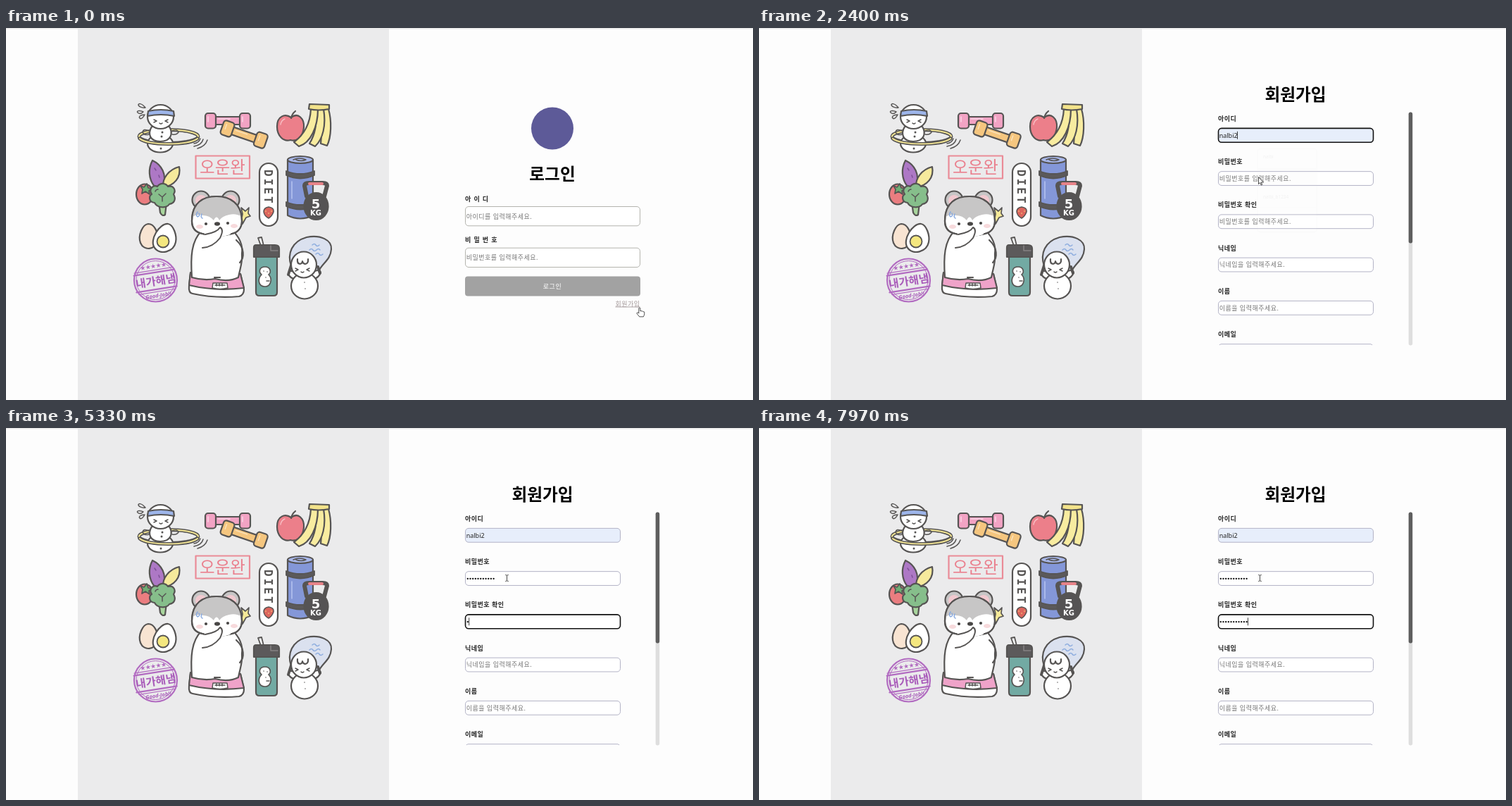
Write an HTML page that moves like this. It is 1061 px wide and 528 px high and loops after 8000 ms.

```html
<!DOCTYPE html>
<html lang="ko">
<head>
<meta charset="utf-8">
<title>회원가입</title>
<style>
html, body { margin: 0; width: 100%; height: 100%; overflow: hidden; background: #fdfdfd; }
svg { display: block; }
text { font: 9px "Noto Sans", "Noto Sans CJK KR", "Noto Sans CJK", sans-serif; letter-spacing: .5px; fill: #222; }
text.title { font-size: 23.7px; font-weight: 700; letter-spacing: 0; text-anchor: middle; fill: #000; }
text.label { font-weight: 700; }
text.wide { letter-spacing: .9px; }
text.hint { fill: #757575; }
text.tiny { font-size: 6.4px; letter-spacing: 0; fill: #777; }
#art { fill: #fff; stroke: #565453; stroke-width: 2.2; stroke-linecap: round; stroke-linejoin: round; }
#art text { stroke: none; letter-spacing: 0; }
#art .thin { stroke-width: 1.5; fill: none; }
#art .flat { stroke: none; }
</style>
</head>
<body>
<svg width="1061" height="528" viewBox="0 0 1061 528">
  <defs>
    <clipPath id="formClip"><rect x="640" y="118" width="260" height="332"/></clipPath>
    <path id="head" d="M264 274C264 248 280 239 299 239S335 249 335 274C335 284 329 290 321 292Q299 298 279 292C269 290 264 284 264 274Z"/>
    <clipPath id="headClip"><use href="#head"/></clipPath>
  </defs>
  <rect width="1061" height="528" fill="#fdfdfd"/>
  <rect x="102" width="442" height="528" fill="#ebebec"/>
  <rect width="1061" height="1.5" fill="#e8e8e8"/>

  <g id="art">
    <!-- hula hoop -->
    <path class="thin" d="M198 113C192 106 188 107 188 109S193 114 198 113M195 119C189 116 185 118 187 120S192 122 195 119M197 123C191 123 188 126 190 128S195 127 197 123"/>
    <ellipse cx="231" cy="154" rx="42" ry="9.5" fill="none" stroke-width="5"/>
    <ellipse cx="231" cy="154" rx="42" ry="9.5" fill="none" stroke="#f5e794" stroke-width="2"/>
    <ellipse cx="219" cy="164" rx="18" ry="12.5"/>
    <path d="M207 140C201 150 204 161 219 161S238 150 232 140Z"/>
    <ellipse cx="219.5" cy="126" rx="18.5" ry="17"/>
    <path d="M202 118Q220 114 238 118L239 125Q220 121 201 125Z" fill="#9db5ea"/>
    <path class="thin" d="M210 130l4 2-4 2M230 130l-4 2 4 2M218 135q2 2 4 0M203 146q-8-4-9 2q3 5 9 3M236 146q8-3 9 2q-3 4-9 3"/>
    <path d="M190 157C201 167 260 167 272 157" fill="none" stroke-width="5"/>
    <path d="M190 157C201 167 260 167 272 157" fill="none" stroke="#f5e794" stroke-width="2"/>
    <path class="thin" d="M267 164q7-1 9-7M267 168q11-2 13-10M272 171q11-3 14-12"/>
    <g class="flat" fill="#565453"><circle cx="222" cy="148" r="1.5"/><circle cx="221" cy="154" r="1.5"/><circle cx="220" cy="171" r="1.5"/></g>

    <!-- dumbbells -->
    <g fill="#f2a3c4">
      <rect x="295" y="126" width="39" height="11"/>
      <rect x="283" y="121" width="15" height="21.5" rx="4"/><rect x="332" y="121" width="15" height="21.5" rx="4"/>
      <path class="thin" d="M287 126v7M336 126v7M301 129h17" stroke="#fbd9e7"/>
    </g>
    <g fill="#f5c67f" transform="translate(338 151.5) rotate(19)">
      <rect x="-20" y="-5.5" width="40" height="11"/>
      <rect x="-33" y="-11" width="16" height="21" rx="4"/><rect x="17" y="-11" width="16" height="21" rx="4"/>
      <path class="thin" d="M-28-6v7M22-6v7M-13-2h17" stroke="#fbe3bd"/>
    </g>

    <!-- fruit -->
    <path d="M405 127C415 119 424 129 423 141C422 154 413 162 404 159C394 162 385 153 385 140C385 125 396 121 405 127Z" fill="#ec7f8a"/>
    <path d="M405 128q1-6 6-10" fill="none"/>
    <path class="thin" d="M390 137q1-6 6-8" stroke="#f8bcc2"/>
    <g fill="#f8eca0">
      <path d="M446 115H458C463 132 462 155 456 167L447 164C449 148 448 132 446 115Z"/>
      <path d="M440 115H451C455 138 450 158 439 168L431 164C440 150 442 135 440 115Z"/>
      <path d="M433 115H443C443 140 433 163 416 168L409 162C424 151 432 135 433 115Z"/>
      <path d="M431 108L459 109L459 115Q444 118 430 115Z" fill="#f3e38b"/>
    </g>

    <!-- banner -->
    <rect x="269.5" y="181.5" width="76.5" height="32" fill="none" stroke="#ea8b97"/>
    <text x="307.5" y="206" style="font-size:23.5px;text-anchor:middle;fill:#ea7f8d">오운완</text>

    <!-- vegetables -->
    <path d="M208 188C221 194 229 208 223 224L211 225C202 214 202 199 208 188Z" fill="#ad78c5"/>
    <path d="M246 197C249 212 239 224 223 226C222 213 231 201 246 197Z" fill="#f6ea9c"/>
    <path class="thin" d="M211 199l2 3M217 209l1 3" stroke="#7f5297"/>
    <ellipse cx="197" cy="236" rx="12" ry="14.5" fill="#ea7d80"/>
    <path d="M191 224l5 2 4-5 2 6 6 1-5 3 1 5-6-4-5 3 1-6Z" fill="#6fae74" stroke-width="1.7"/>
    <path d="M217 247L219 262Q222 268 226 265L228 248Z" fill="#a8d59d"/>
    <path d="M211 248C202 247 203 238 207 236C202 229 209 222 215 225C219 219 227 220 230 225C238 223 242 230 238 236C242 243 239 249 232 250C228 256 215 256 211 248Z" fill="#86be8b"/>
    <path class="thin" d="M217 236l5 4 5-5M222 240v6M212 232q1-3 4-3"/>

    <!-- capsule -->
    <rect x="360" y="192" width="26" height="89" rx="13"/>
    <text transform="translate(367 201) rotate(90)" style="font:700 16px 'DejaVu Sans Mono',monospace;letter-spacing:3px;fill:#565453">DIET</text>
    <path d="M373 254q8 1 7 7q-2 6-7 9q-6-3-7-9q0-6 7-7Z" fill="#dd665d" stroke-width="1.5"/>
    <path class="thin" d="M369 260h.1M373 263h.1M377 260h.1" stroke="#f7df85"/>

    <!-- mat and kettlebell -->
    <path d="M400 187V266Q418 275 436 266V187Z" fill="#8497d8"/>
    <ellipse cx="418" cy="187" rx="18" ry="5" fill="#a9b8eb"/>
    <path class="thin" d="M408 187q9-4 18 0q-7 3-14 0"/>
    <path class="thin" d="M406 218v24" stroke="#b7c4f0"/>
    <path d="M398 203Q418 211 438 203V209Q418 218 398 209ZM398 247Q418 255 438 247V253Q418 262 398 253Z" fill="#5b595a" stroke-width="1.8"/>
    <path d="M427 239L424 224Q424 220 430 220H450Q456 220 456 224L452 239" fill="none" stroke-width="6"/>
    <path d="M431 221h18" stroke="#e78288" stroke-width="4"/>
    <ellipse cx="440.5" cy="253" rx="17" ry="19" fill="#555354"/>
    <text x="440" y="256" style="font:900 18px 'DejaVu Sans',sans-serif;text-anchor:middle;fill:#fff">5</text>
    <text x="440" y="265.5" style="font:900 10px 'DejaVu Sans',sans-serif;text-anchor:middle;fill:#fff">KG</text>

    <!-- eggs -->
    <path d="M202 278C211 278 217 291 215 302C212 315 196 317 191 305C187 294 194 279 202 278Z" fill="#f8e4d2"/>
    <path d="M230 278C238 279 243 295 241 304C238 318 219 323 211 312C203 301 218 277 230 278Z"/>
    <circle cx="223" cy="303" r="8.5" fill="#f4e77f" stroke-width="1.8"/>

    <!-- purple stamp -->
    <g fill="none" stroke="#b26cc1">
      <circle cx="212.5" cy="358" r="30.5"/>
      <circle cx="212.5" cy="358" r="27.5" stroke-width="1"/>
      <g transform="rotate(-9 212 358)">
        <path d="M183 347H241M183 371H241" stroke-width="2.2"/><path d="M184 343.5H240M186 374.5H238" stroke-width="1.2"/>
        <text x="212.5" y="365" style="font-size:15.6px;font-weight:700;text-anchor:middle;fill:#a95cba">내가해냄</text>
        <text x="212" y="341" style="font:9px 'DejaVu Sans',sans-serif;letter-spacing:-.5px;text-anchor:middle;fill:#b26cc1">★★★★★</text>
        <text x="213" y="382.5" style="font:italic 700 7.5px 'Noto Sans',sans-serif;text-anchor:middle;fill:#a95cba">Good-Job!!</text>
      </g>
    </g>

    <!-- hamster on scale -->
    <path d="M262 348Q298 342 333 349L338 371Q338 379 331 381Q297 384 265 377Q259 376 260 366Z"/>
    <path d="M262 347Q298 342 333 349L338 369Q297 374 260 365Z" fill="#efa3c9"/>
    <path d="M294 362h20l1 7q-11 3-22 0Z" stroke-width="1.5"/><path class="thin" d="M297 365h14M299 363v3M303 363v3M307 363v3"/>
    <path d="M278 288C263 302 262 325 264 354Q281 359 297 356Q316 361 330 354C332 342 336 335 335 321C337 308 331 296 322 288Z"/>
    <path d="M327 301C339 312 339 326 332 333M296 354h8" fill="none"/>
    <circle cx="277" cy="244" r="12.5" fill="#c7c6c6"/><circle cx="319" cy="244" r="12.5" fill="#c7c6c6"/>
    <circle class="flat" cx="277" cy="245" r="8" fill="#f1c9cf"/><circle class="flat" cx="319" cy="245" r="8" fill="#f1c9cf"/>
    <use href="#head"/>
    <path class="flat" clip-path="url(#headClip)" fill="#c7c6c6" d="M262 270V236H338V270Q328 262 317 265Q307 267 303 273Q299 264 295 273Q289 266 280 266Q271 263 262 270Z"/>
    <use href="#head" fill="none"/>
    <path d="M284 292Q299 297 317 291" stroke="#fff" fill="none" stroke-width="4.5"/>
    <path d="M279 312Q294 311 304 298Q310 286 304 283Q300 290 283 293" stroke-width="2"/>
    <path class="thin" d="M272 261q-3 5 0 7q4-1 2-5M278 264q-2 5 1 6" stroke="#86a8df"/>
    <g class="flat"><ellipse cx="275" cy="282" rx="5" ry="3" fill="#f7dadc"/><ellipse cx="324" cy="281" rx="5" ry="3" fill="#f7dadc"/>
    <g fill="#494746"><circle cx="284" cy="278" r="2.1"/><circle cx="315" cy="277" r="2.1"/><ellipse cx="300" cy="278" rx="4" ry="2.8"/></g></g>
    <path d="M334 255l6 5 5-5-1 8 3 4-6 2-5 9-1-9 1-5Z" fill="#f5e998" stroke-width="1.7"/>

    <!-- bottle -->
    <path d="M362 309L358 298L363 297L366 309" fill="#f7f7f7" stroke-width="1.8"/>
    <path d="M355 324V375Q355 380 360 380H380Q385 380 385 375V324Z" fill="#72aaa3"/>
    <path d="M355 308H382Q388 308 388 313V325H352V312Q352 308 355 308Z" fill="#5c5a5b"/>
    <path class="thin" d="M376 309v7h10" stroke="#858384"/>
    <path d="M368 339c8 0 9 8 5 11c6 6 3 17-5 17c-10 0-11-11-5-17c-4-3-4-11 5-11Z" stroke-width="1.7"/>
    <path class="thin" d="M366 345h.1M371 346h.1M369 354v.1M370 359h4"/>

    <!-- jump rope -->
    <path d="M405 338C399 320 406 303 427 297C447 293 463 301 462 314C461 329 450 333 444 345" fill="#dbe1ef"/>
    <path class="thin" d="M435 308q3-3 5 0t5 0M431 315q3-3 5 0t5 0t5 0M440 321q3-3 5 0t5 0" stroke="#8eaddf"/>
    <path d="M412 347Q402 342 401 349Q404 356 411 356M435 347Q445 341 447 347Q444 355 437 356"/>
    <path d="M401 350l4-13M446 348l-3-9" stroke-width="4"/>
    <ellipse cx="424" cy="366" rx="19" ry="18.5"/>
    <ellipse cx="423" cy="336" rx="18" ry="18.5"/>
    <path d="M414 328c-1 9 7 8 7 3c1 6 9 5 8-3" fill="none"/>
    <path class="thin" d="M411 341l4 2-4 2M431 341l-4 2 4 2M419 346q2 2 4 0M424 361v.1M425 370v.1"/>
  </g>

  <g id="login">
    <circle cx="776" cy="142.5" r="30" fill="#5d5a98"/>
    <text class="title" x="776" y="215.5">로그인</text>
    <rect x="652" y="352.5" width="249" height="28" rx="4" fill="#a2a2a2"/>
    <text x="776" y="369.5" text-anchor="middle" style="fill:#fff">로그인</text>
    <text x="865.5" y="394.5" style="fill:#a39899;text-decoration:underline">회원가입</text>
  </g>

  <g id="signup">
    <text class="title" x="762" y="103.2">회원가입</text>
    <g id="form" clip-path="url(#formClip)"></g>
    <rect x="922.7" y="119.5" width="5.5" height="331" rx="2.7" fill="#dedede"/>
    <rect x="922.7" y="119.5" width="5.5" height="186" rx="2.7" fill="#5e5e5e"/>
  </g>

  <path id="caret" stroke="#111" stroke-width=".8"/>

  <g id="popup">
    <rect x="708" y="171.5" width="84" height="118" rx="3" fill="#fff" stroke="#d4d4d4"/>
    <rect x="709" y="199" width="82" height="26" fill="#ededed"/>
    <path d="M708 255h84" stroke="#e2e2e2"/>
    <text class="tiny" x="716" y="185">nalbi</text>
    <text class="tiny" x="716" y="214">nalbi2</text>
    <text class="tiny" x="716" y="242">nalbi_b1234</text>
    <text class="tiny" x="716" y="274">관리...</text>
  </g>

  <g id="status">
    <path d="M0 516H70Q73 516 73 519V528H0Z" fill="#e6e6e6"/>
    <text class="tiny" x="2.5" y="525">localhost:5173/signup</text>
  </g>

  <g id="cursor" fill="#fff" stroke="#333" stroke-width=".9" stroke-linejoin="round" stroke-linecap="round">
    <path id="hand" transform="scale(.95)" d="M-1 7V.6Q0-.6 1.2.6V5Q2.6 4 3.500 5.300Q5 4.600 5.600 6Q7.500 5.500 7.500 7.500Q7.600 11 6 13.500H0L-4 8.500Q-3.500 6-1 8Z"/>
    <path id="arrow" d="M0 0V9.500L2.200 7.500 3.800 11 5.200 10.300 3.700 7H6.700Z"/>
    <path id="beam" fill="none" d="M-1.800-4.500Q0-4.500 0-3.500Q0-4.500 1.800-4.500M0-3.500V3.500M-1.800 4.500Q0 4.500 0 3.500Q0 4.500 1.800 4.500"/>
  </g>
</svg>
<script>
const LOOP = 8000, OPEN = 400, DOT = 3.68, SLOTS = 11;
const $ = id => document.getElementById(id);

function add(parent, tag, attrs, content = '') {
  const node = document.createElementNS('http://www.w3.org/2000/svg', tag);
  for (const key in attrs) node.setAttribute(key, attrs[key]);
  node.textContent = content;
  parent.append(node);
  return node;
}

const show = (node, on) => node.style.display = on ? '' : 'none';

function addField(parent, label, object, y, w, h, labelGap, labelClass, stroke) {
  const mid = y + h / 2, hint = object + ' 입력해주세요.';
  add(parent, 'text', { x: 652, y: y - labelGap, class: labelClass }, label);
  const box = add(parent, 'rect', { x: 652.5, y, width: w, height: h, rx: 4.5, fill: '#fff', stroke });
  const text = add(parent, 'text', { x: 653.7, y: mid + 3.4, class: 'hint' }, hint);
  const dots = add(parent, 'g', { fill: '#111' });
  for (let i = 0; i < SLOTS; i++) add(dots, 'circle', { cx: 655.8 + i * DOT, cy: mid + .3, r: 1.2 });
  show(dots, false);
  return { box, text, dots, hint, mid, stroke };
}

addField($('login'), '아 이 디', '아이디를', 253.5, 248, 27.3, 7.5, 'label wide', '#b4b4ae');
addField($('login'), '비 밀 번 호', '비밀번호를', 312.2, 248, 27.3, 7.8, 'label wide', '#b4b4ae');

const fields = [
  ['아이디', '아이디를'], ['비밀번호', '비밀번호를'], ['비밀번호 확인', '비밀번호를'],
  ['닉네임', '닉네임을'], ['이름', '이름을'], ['이메일', '이메일을'],
].map(([label, object], i) =>
  addField($('form'), label, object, 142.4 + i * 61.25, 220, 19.8, 10.5, 'label', '#b3b3c6'));

const path = [[0, 899.7, 397], [480, 899.7, 397], [1030, 691, 183], [1300, 700, 153], [1750, 700, 153],
  [2150, 709.5, 212], [2450, 709.5, 212], [2540, 711.5, 213], [LOOP, 711.5, 213]];

function cursorAt(t) {
  const i = path.findIndex(p => p[0] > t);
  const [t0, x0, y0] = path[i - 1], [t1, x1, y1] = path[i];
  const k = (t - t0) / (t1 - t0), ease = k * k * (3 - 2 * k);
  return [x0 + (x1 - x0) * ease, y0 + (y1 - y0) * ease];
}

// When each of the first three fields gains focus, and the rhythm of its key presses
const FILL = 2280;
const entries = [
  { focus: 1450, start: FILL, step: 0 },
  { focus: 2530, start: 2450, step: 186 },
  { focus: 5000, start: 5100, step: 220 },
];
const typed = (t, { start, step }) =>
  step ? Math.max(0, Math.min(SLOTS, Math.floor((t - start) / step))) : 0;

function draw(now) {
  const t = now % LOOP;
  show($('login'), t < OPEN);
  show($('signup'), t >= OPEN);
  show($('status'), t > 130 && t < 1350);

  const filled = t >= FILL;
  const active = entries.filter(e => t >= e.focus).length - 1;
  fields.forEach((f, i) => {
    const count = entries[i] ? typed(t, entries[i]) : 0, named = i === 0 && filled;
    f.text.textContent = named ? 'nalbi2' : count ? '' : f.hint;
    f.text.setAttribute('class', named ? '' : 'hint');
    f.text.style.letterSpacing = named ? '0' : '';
    f.box.setAttribute('fill', named ? '#e7eefb' : '#fff');
    f.box.setAttribute('stroke', i === active ? '#111' : f.stroke);
    f.box.setAttribute('stroke-width', i === active ? 1.6 : 1);
    show(f.dots, count);
    [...f.dots.children].forEach((dot, j) => show(dot, j < count));
  });

  // The caret blinks from the latest key press
  let caretOn = false;
  if (active >= 0) {
    const entry = entries[active], count = typed(t, entry), y = fields[active].mid;
    const x = 654 + (active === 0 && filled ? 25.5 : count * DOT);
    const pressed = count || (active === 0 && filled) ? entry.start + count * entry.step : entry.focus;
    caretOn = (t - pressed) % 1060 < 530;
    $('caret').setAttribute('d', `M${x} ${y - 5.5}V${y + 5.5}`);
  }
  show($('caret'), caretOn);

  const fade = Math.max(0, Math.min(1, 1 - (t - FILL) / 130));
  $('popup').setAttribute('opacity', t < 1550 ? 0 : fade);

  const [x, y] = cursorAt(t);
  const overField = t > OPEN && x < 873 && (Math.abs(y - fields[0].mid) < 10 || t >= 2500);
  $('cursor').setAttribute('transform', `translate(${x} ${y})`);
  show($('hand'), t < OPEN);
  show($('arrow'), t >= OPEN && !overField);
  show($('beam'), overField);
  requestAnimationFrame(() => draw(performance.now()));
}
draw(0);
</script>
</body>
</html>
```
